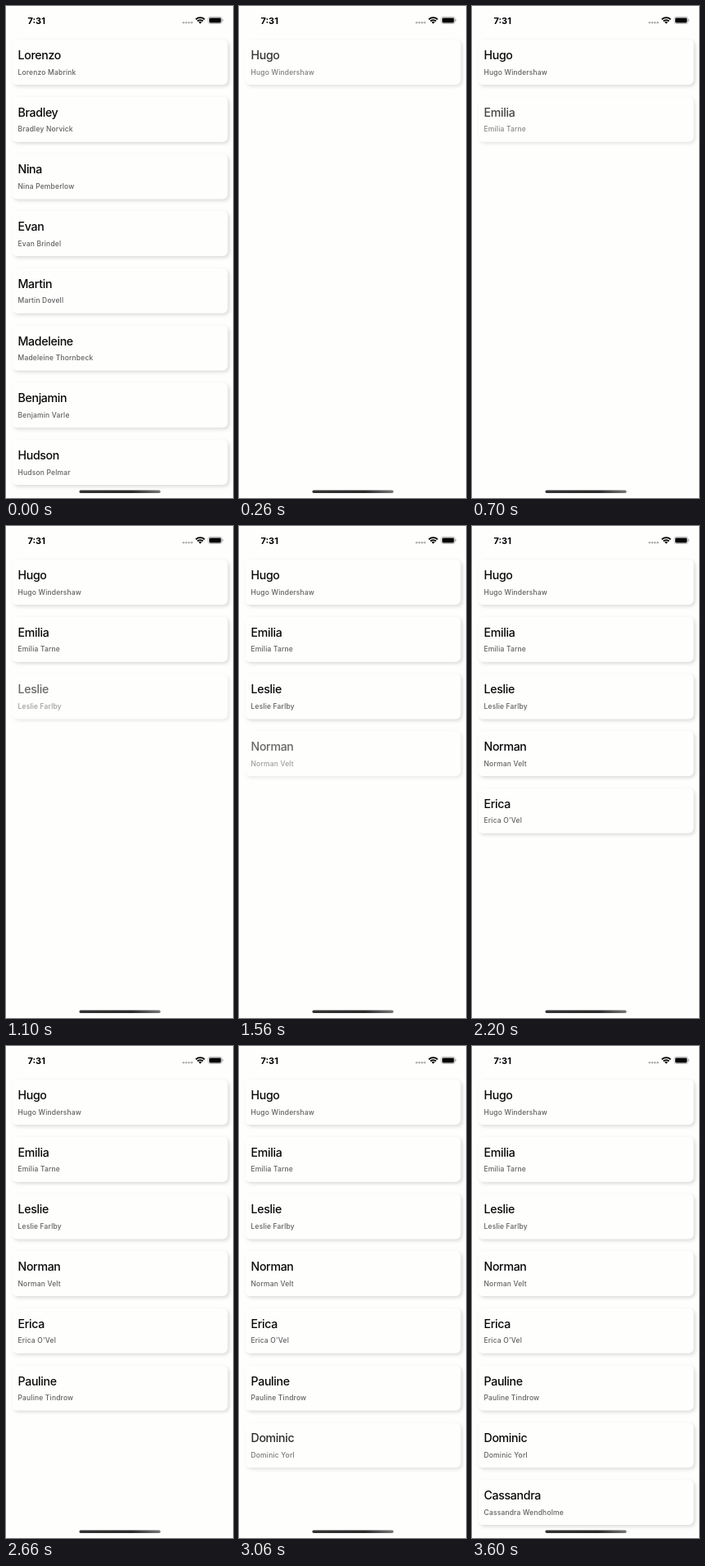
Write an HTML page that moves like this. It is 277 by 600 pixels and loops after 4 s.

```html
<!DOCTYPE html>
<html lang="en">
<head>
<meta charset="utf-8">
<title>Fading list</title>
<style>
  html, body { margin: 0; width: 100%; height: 100%; overflow: hidden; background: #fefefd; }
  svg { display: block; width: 277px; height: 600px; font-family: Inter, sans-serif; }
  .card { fill: #fefefd; filter: drop-shadow(2.8px 2.8px 2px rgba(0, 0, 0, .14)); }
  .title { font-size: 14.2px; font-weight: 500; letter-spacing: -.35px; fill: #080808; }
  .name { font-size: 8.5px; font-weight: 500; letter-spacing: .17px; fill: #606060; }
  .clock { font-size: 11px; font-weight: 650; }
</style>
</head>
<body>
<svg viewBox="0 0 277 600">
  <defs>
    <linearGradient id="bar">
      <stop offset="0" stop-color="#333"/>
      <stop offset=".65" stop-color="#2a2a2a"/>
      <stop offset="1" stop-color="#777"/>
    </linearGradient>
  </defs>
  <rect width="277" height="600" fill="#fefefd"/>
  <g id="before"></g>
  <g id="after"></g>
  <text class="clock" x="26.4" y="21.6">7:31</text>
  <g fill="#aaa">
    <circle cx="216.7" cy="20.2" r="1.2"/>
    <circle cx="220" cy="20.2" r="1.2"/>
    <circle cx="223.3" cy="20.2" r="1.2"/>
    <circle cx="226.6" cy="20.2" r="1.2"/>
  </g>
  <g fill="none" stroke="#000" stroke-width="1.8">
    <path d="M231.6 16.3a7.7 7.7 0 0 1 10.8 0"/>
    <path d="M233.6 18.5a4.8 4.8 0 0 1 6.8 0"/>
  </g>
  <path d="M237 21.8l-1.9-2a2.7 2.7 0 0 1 3.8 0z"/>
  <rect x="246.9" y="13.3" width="16.6" height="8.2" rx="2.3" fill="none" stroke="#aaa" stroke-width=".8"/>
  <rect x="248" y="14.4" width="14.4" height="6" rx="1.3"/>
  <path d="M264.3 16v2.8q1-.4 1-1.4t-1-1.4z" fill="#999"/>
  <rect x="89.5" y="590.6" width="99" height="3.3" rx="1.65" fill="url(#bar)"/>
</svg>
<script>
  const LOOP = 4000, FPS = 30, SWAP = 30;
  const FADE = 464, FIRST = -110;
  const PITCH = 69.7;

  const oldNames = ["Lorenzo Mabrink", "Bradley Norvick", "Nina Pemberlow", "Evan Brindel",
    "Martin Dovell", "Madeleine Thornbeck", "Benjamin Varle", "Hudson Pelmar"];
  const newNames = ["Hugo Windershaw", "Emilia Tarne", "Leslie Farlby", "Norman Velt",
    "Erica O'Vel", "Pauline Tindrow", "Dominic Yorl", "Cassandra Wendholme"];

  function add(parent, tag, attrs, text = "") {
    const el = document.createElementNS("http://www.w3.org/2000/svg", tag);
    for (const key in attrs) el.setAttribute(key, attrs[key]);
    el.textContent = text;
    return parent.appendChild(el);
  }

  function buildList(id, names) {
    const list = document.getElementById(id);
    const rows = names.map((name, i) => {
      const row = add(list, "g", { transform: `translate(0 ${(i * PITCH).toFixed(1)})` });
      add(row, "rect", { class: "card", x: 7.5, y: 41, width: 263, height: 55, rx: 6 });
      add(row, "text", { class: "title", x: 14.5, y: 65.1 }, name.split(" ")[0]);
      add(row, "text", { class: "name", x: 14.5, y: 83.7 }, name);
      return row;
    });
    return { list, rows };
  }

  const before = buildList("before", oldNames);
  const after = buildList("after", newNames);

  function draw(ms) {
    const swapped = ms >= SWAP;
    before.list.style.display = swapped ? "none" : "";
    after.list.style.display = swapped ? "" : "none";
    // Snap to 30 steps per second, with delays rounded down to 10 ms.
    const step = Math.floor((Math.floor(ms / 10) * 10 + 9.9) * FPS / 1000);
    const t = step * 1000 / FPS;
    // Each row fades in linearly as soon as the previous one is done.
    after.rows.forEach((row, i) => {
      const p = (t - FIRST) / FADE - i;
      row.style.opacity = Math.max(0, Math.min(1, p));
    });
  }

  const start = performance.now();
  function tick() {
    draw((performance.now() - start) % LOOP);
    requestAnimationFrame(tick);
  }
  tick();
</script>
</body>
</html>
```
